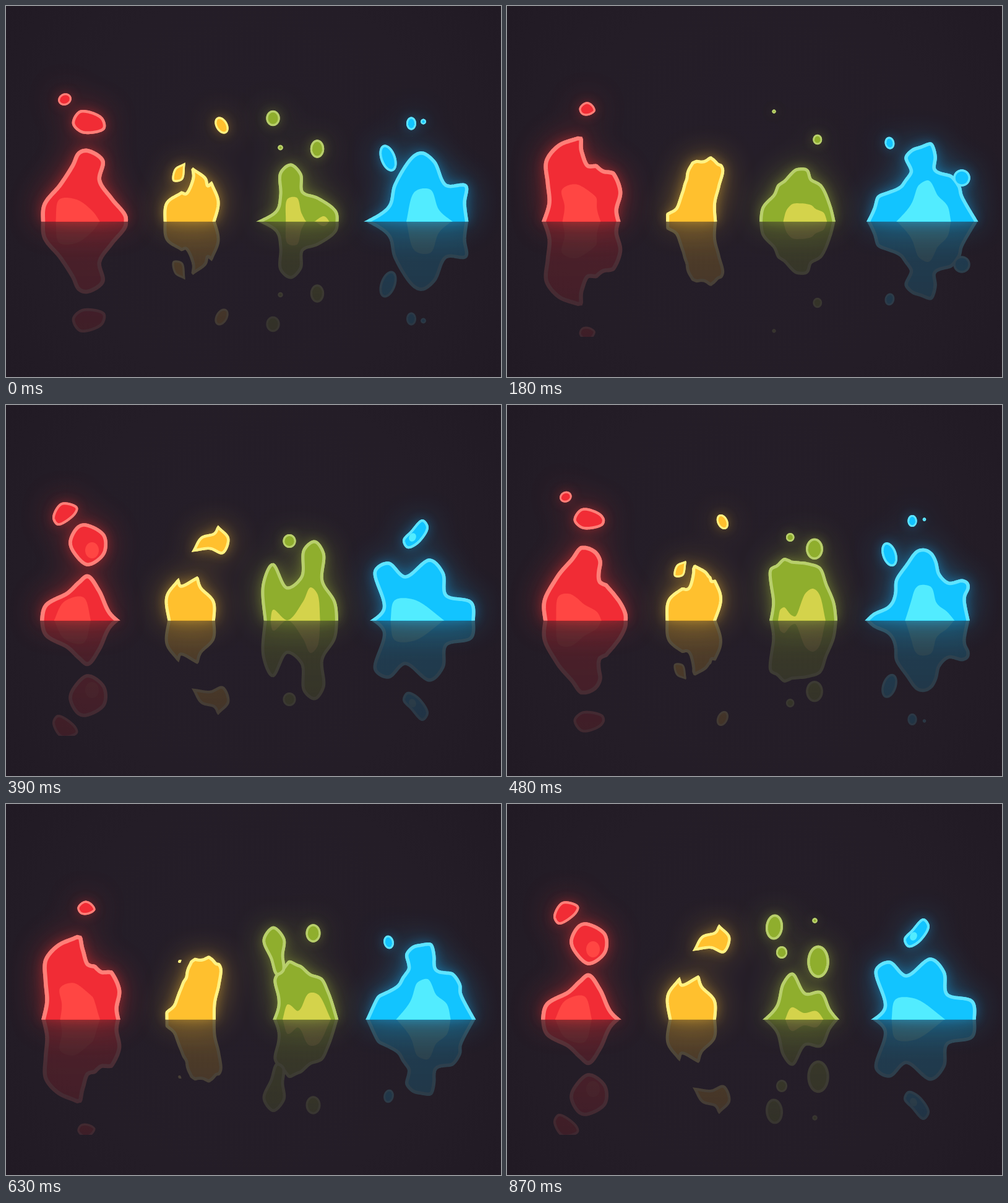
These frames come from a looping animation (800 by 600 pixels, 0.9 s). An HTML page with a canvas:

```html
<!DOCTYPE html>
<html lang="en">
<head>
<meta charset="utf-8">
<title>Elemental blobs</title>
<style>
html, body { margin: 0; width: 100%; height: 100%; overflow: hidden; background: #231c26; }
canvas { display: block; width: 800px; height: 600px; }
</style>
</head>
<body>
<canvas id="stage" width="800" height="600"></canvas>
<script>
const W = 800, H = 600, FLOOR = 348, STEP = 30, FRAMES = 30, CYCLE = 15, N = 170;

const element = (fill, edge, glint, glow, line, period) =>
  ({ fill, edge, glint, glow, line, period, bodies: [], shines: [] });
const red = element('#f12c35', '#ff7f78', '#ff4643', '255,50,50', 6.5, CYCLE);
const yellow = element('#ffc02e', '#fff283', '', '255,196,50', 5, CYCLE);
const green = element('#8fae2d', '#b8cf6c', '#d4d34b', '165,190,55', 5, FRAMES);
const blue = element('#12c4ff', '#5fe4ff', '#52ecff', '20,180,255', 5.5, CYCLE);

const mix = (a, b, t) => [a[0] + (b[0] - a[0]) * t, a[1] + (b[1] - a[1]) * t];
const gap = (a, b) => Math.hypot(b[0] - a[0], b[1] - a[1]);

function ellipse([cx, cy, rx, ry = rx, tilt = 0]) {
  const r = tilt * Math.PI / 180, c = Math.cos(r), s = Math.sin(r);
  return Array.from({ length: N }, (_, i) => {
    const a = Math.PI + i / N * 2 * Math.PI, x = rx * Math.cos(a), y = ry * Math.sin(a);
    return [cx + x * c - y * s, cy + x * s + y * c];
  });
}

// Centripetal spline through the points, resampled evenly. A negative x marks a corner.
function curve(nums, open) {
  const pts = [];
  for (let i = 0; i < nums.length; i += 2) {
    const p = [Math.abs(nums[i]), nums[i + 1]];
    pts.push(p);
    if (nums[i] < 0) pts.push(p);
  }
  const n = pts.length, fine = [];
  const at = i => open ? pts[Math.max(0, Math.min(n - 1, i))] : pts[(i + n) % n];
  for (let i = 0; i < (open ? n - 1 : n); i++) {
    const [a, b, c, d] = [at(i - 1), at(i), at(i + 1), at(i + 2)];
    const u = Math.sqrt(gap(a, b)), v = Math.sqrt(gap(b, c)), w = Math.sqrt(gap(c, d));
    if (!v) continue;
    const coef = [0, 1].map(j => {
      const e = c[j] - b[j];
      const m = u ? e + v * ((b[j] - a[j]) / u - (c[j] - a[j]) / (u + v)) : e;
      const q = w ? e + v * ((d[j] - c[j]) / w - (d[j] - b[j]) / (v + w)) : e;
      return [b[j], m, 3 * e - 2 * m - q, m + q - 2 * e];
    });
    for (let k = 0; k < 20; k++) {
      const t = k / 20;
      fine.push(coef.map(([p, q, r, s]) => p + t * (q + t * (r + t * s))));
    }
  }
  fine.push(at(open ? n - 1 : 0));
  const len = [0];
  for (let i = 1; i < fine.length; i++) len.push(len[i - 1] + gap(fine[i - 1], fine[i]));
  const total = len[len.length - 1], out = [];
  for (let i = 0, k = 1; i < N; i++) {
    const want = total * i / (open ? N - 1 : N);
    while (k < len.length - 1 && len[k] < want) k++;
    out.push(mix(fine[k - 1], fine[k], (want - len[k - 1]) / (len[k] - len[k - 1] || 1)));
  }
  return out;
}

// Another key's pose, stretched upward from the floor.
const as = (of, k = 1) => ({ of, k });

function shrunk(pts) {
  const sum = pts.reduce((s, p) => [s[0] + p[0], s[1] + p[1]], [0, 0]);
  const c = [sum[0] / N, sum[1] / N - 4];
  return pts.map(p => mix(c, p, .02));
}

// Up to five numbers: an ellipse (cx, cy, rx, ry, tilt). More: curve points. Null: shrink away.
function track(poses, open) {
  const times = Object.keys(poses).map(Number).sort((a, b) => a - b);
  const solve = t => {
    const p = poses[t];
    if (!p) return shrunk(solve(times[times.indexOf(t) - 1]));
    if (p.of !== undefined) return solve(p.of).map(([x, y]) => [x, FLOOR + (y - FLOOR) * p.k]);
    return p.length < 6 ? ellipse(p) : curve(p, open);
  };
  return times.map(at => ({ at, pts: solve(at) }));
}

const looped = (e, poses) => track({ ...poses, [e.period]: as(0) }, true);
const base = (e, poses) => e.bodies.push(looped(e, poses));
const shine = (e, poses) => e.shines.push(looped(e, poses));
const drop = (e, poses) => e.bodies.push(track(poses, false));
const spot = (e, poses) => e.shines.push(track(poses, false));

base(red, {
  0: [60,356, 62,322, 88,289, 108,258, 118,238, 131,234, 156,250, 151,282, 171,312, 193,340, 193,356],
  3: [69,356, 54,302, 66,259, 106,233, -118,221, 141,238, 137,275, 148,294, -162,280, 185,308, 188,356],
  8: [48,358, 77,319, 73,285, 61,246, 80,214, -118,209, 107,233, 124,256, -147,242, 178,264, 184,298, 169,330, 179,358],
  9: [53,358, 92,312, 97,267, 72,222, 82,196, -121,198, 108,217, 123,240, -148,228, 175,249, 178,282, 161,322, 180,358],
  11: as(9, 1.06),
  12: as(13, 1.05),
  13: [57,358, 64,325, 100,304, 118,287, 132,277, 150,300, 167,336, 188,356]
});
drop(red, {
  12: as(13, .95),
  13: [104,222, 115,199, 127,194, 158,211, 158,240, 132,258, 111,240],
  15: [109,190, 120,171, 154,181, 158,198, 124,204],
  18: [111,178, 126,165, 151,178, 121,188],
  23: [129,160, 6.5,9, 25],
  24: null
});
drop(red, {
  12: as(13, .97),
  13: [77,182, 90,160, 114,166, 110,177, 84,193],
  15: [95,151, 9.5,8, -25],
  18: [94.5,144, 6.5,5.5, -30],
  20: null
});
shine(red, {
  0: [80,352, 86,313, 114,313, 140,332, 154,352],
  3: [77,352, 80,300, 100,296, 118,325, 149,331, 155,352],
  8: [97,352, 104,322, 95,295, 120,283, 159,297, 143,329, 151,352],
  9: [94,352, 116,313, 113,277, 138,273, 148,297, 140,326, 149,352],
  13: [76,352, 94,318, 125,311, 138,352]
});
spot(red, { 12: as(13, .95), 13: [139,235, 11,13], 15: null });

base(yellow, {
  0: [257,356, 260,319, -284,302, 291,304, 303,278, -302,264, 322,279, 326,291, -332,287, 343,317, 334,356],
  3: [262,356, 265,308, 283,288, 296,286, -299,252, 326,262, 331,270, -336,268, 352,303, 331,356],
  8: [258,358, -258,336, 282,334, 291,304, 288,264, -301,249, 324,250, -334,236, 355,257, 336,287, 328,315, 342,358],
  9: [259,358, -261,318, 288,317, 301,285, 296,254, 320,241, -337,225, 360,250, 337,273, 327,300, 343,358],
  11: as(9, 1.08),
  12: as(13, .94),
  13: [265,356, 260,310, -278,284, 282,293, -309,280, 314,295, 335,318, 335,356]
});
drop(yellow, {
  12: as(13, .94),
  13: [-304,235, 316,215, 337,208, -343,198, 359,216, 350,239, 330,232],
  15: [348.5,193, 8,13, -30],
  18: [348,181, 5.5,8, -10],
  20: null
});
drop(yellow, {
  14: as(15, .92),
  15: [271,282, 274,264, -288,256, 284,280],
  18: [273,264, 277,252, -289,250, 283,265],
  21: null
});

base(green, {
  0: [400,354, 438,331, 444,305, 444,270, 460,257, 476,272, 479,301, 504,311, 533,333, 535,356],
  3: [408,358, 416,327, 447,313, 441,260, 460,243, 476,260, 471,298, 498,296, 526,322, 533,358],
  9: [411,358, 414,306, 430,285, 456,306, 478,282, 499,252, 516,275, 518,326, 528,358],
  13: [420,358, 416,290, 431,258, 454,296, 478,278, 482,234, 499,221, 513,240, 511,285, 531,319, 535,358],
  18: [428,358, 441,320, 419,260, 433,224, 448,260, 468,279, 502,272, 520,296, 531,358],
  24: [433,358, 444,320, 448,295, 475,294, 502,262, 518,280, 521,312, 544,358],
  29: [407,358, 436,328, 447,290, 461,275, 482,307, 507,305, 522,334, 542,358]
});
drop(green, {
  21: as(24, .96),
  24: [417,214, 432,194, 449,213, 447,240, 448,266, 438,272, 429,246],
  29: [432,199, 12,18.5, 5],
  30: [431.5,181.5, 9.5,11],
  33: [431.5,173.5, 7.5],
  37: null
});
drop(green, { 28: as(29, .96), 29: [444,240, 7.5,8.5], 30: [443.5,229, 3], 31: null });
drop(green, {
  27: as(29, .94),
  29: [503,255, 15.5,24],
  30: [503,231, 9.5,13],
  33: [502,221, 8.5,9.5],
  39: [501.5,211, 3.5,4],
  41: null
});
drop(green, {
  7: as(9, .95),
  9: [445,245, 459,223, 474,233, 462,254, 448,259],
  13: [458,220, 9,9.5],
  18: [457.5,210, 3],
  19: null
});
drop(green, { 16: as(18, .9), 18: [497,220, 12,17], 24: [496,198, 8.5,9], 29: [497.5,188.5, 3], 30: null });
shine(green, {
  0: [452,352, 455,312, 470,310, 478,336, 490,352, 514,340, 525,352],
  3: [448,352, 457,314, 474,318, 491,343, 514,335, 523,352],
  9: [443,352, 452,332, 480,322, 500,307, 514,352],
  13: [427,352, 432,331, 455,348, 480,318, 492,295, 503,305, 508,352],
  18: [444,352, 453,320, 468,341, 480,303, 500,300, 521,352],
  24: [448,352, 460,325, 480,329, 500,310, 533,352],
  29: [448,352, 460,329, 480,338, 500,335, 514,352]
});

base(blue, {
  0: [570,357, 619,325, 629,289, 659,243, 673,238, 692,252, 711,290, 743,291, 741,319, 746,358],
  3: [583,358, 593,328, 622,321, 635,295, 631,272, 653,249, 673,224, 695,239, 692,278, 716,285, 741,273, 746,293, 735,305, 749,358],
  8: [577,358, 595,328, 590,298, 645,295, 662,274, 634,251, 658,229, 679,205, 693,226, 677,252, 722,294, 773,357],
  9: [590,358, 605,330, 591,291, 612,281, 648,298, 667,271, 636,238, 658,217, 676,199, 688,219, 671,253, 718,287, 764,358],
  10: as(9, 1.03),
  11: as(13, .97),
  13: [582,357, 611,330, 597,268, 618,256, 645,278, 685,251, 706,272, 711,308, 752,320, 755,358]
});
drop(blue, {
  11: as(13, .97),
  13: [643,219, 655,205, 673,187, 681,198, 665,223, 649,230],
  15: [655,190, 6.5,9],
  18: [655,182.5, 5.5,6.5],
  21: null
});
drop(blue, { 15: [674.5,187, 3.2], 17: null });
drop(blue, { 14: as(15, .92), 15: [617.5,246, 10.5,20.5, -20], 18: [619,233, 8.5,14, -15], 23: [618,214, 5], 24: null });
drop(blue, { 6: [735,278, 12], 8: [732.5,272, 9], 9: [732,264, 6.5,7.5], 12: null });
shine(blue, {
  0: [646,352, 661,300, 686,297, 700,330, 726,352],
  3: [634,352, 655,312, 662,283, 683,288, 690,318, 716,325, 726,352],
  8: [621,352, 650,328, 680,278, 706,310, 713,352],
  9: [606,352, 618,328, 650,322, 682,288, 698,313, 724,352],
  13: [621,352, 628,316, 660,315, 713,352]
});
spot(blue, { 7: as(8), 8: [664,253, 4.5,7], 9: [659,240, 9], 13: [657,214, 5.5,7, 25], 15: null });

function pose(keys, time, period) {
  for (const t of [time, time + period]) {
    const i = keys.findIndex(k => k.at >= t);
    if (i < 0 || (i === 0 && keys[0].at > t)) continue;
    if (keys[i].at === t) return keys[i].pts;
    const a = keys[i - 1], b = keys[i], f = (t - a.at) / (b.at - a.at);
    return a.pts.map((p, j) => mix(p, b.pts[j], f));
  }
  return null;
}

function size(pts) {
  let area = 0;
  pts.forEach((p, i) => { const q = pts[(i + 1) % N]; area += p[0] * q[1] - q[0] * p[1]; });
  return Math.sqrt(Math.abs(area) / 2);
}

const layer = () => Object.assign(document.createElement('canvas'), { width: W, height: H }).getContext('2d');
const stage = document.getElementById('stage').getContext('2d');
const blob = layer(), mirror = layer();

const backdrop = stage.createRadialGradient(400, 300, 60, 400, 300, 500);
backdrop.addColorStop(0, '#251e29');
backdrop.addColorStop(.6, '#241d27');
backdrop.addColorStop(1, '#211a24');

const fade = mirror.createLinearGradient(0, FLOOR, 0, 535);
fade.addColorStop(0, 'rgba(0,0,0,.26)');
fade.addColorStop(.35, 'rgba(0,0,0,.18)');
fade.addColorStop(1, 'rgba(0,0,0,.13)');

function trace(pts) {
  blob.beginPath();
  pts.forEach(p => blob.lineTo(p[0], p[1]));
  blob.closePath();
  blob.fill();
}

function drawElement(e, time) {
  blob.clearRect(0, 0, W, H);
  blob.save();
  blob.beginPath();
  blob.rect(0, 0, W, FLOOR + .5);
  blob.clip();
  blob.miterLimit = 4;
  blob.strokeStyle = e.edge;
  blob.fillStyle = e.fill;
  for (const body of e.bodies) {
    const pts = pose(body, time, e.period), s = pts && size(pts);
    if (!pts || s < 2) continue;
    trace(pts);
    blob.lineWidth = Math.min(e.line, 2 + s * .07);
    blob.stroke();
  }
  blob.fillStyle = e.glint;
  for (const keys of e.shines) {
    const pts = pose(keys, time, e.period);
    if (pts) trace(pts);
  }
  blob.restore();
}

function glow(e, alpha, blur) {
  stage.shadowColor = `rgba(${e.glow},${alpha})`;
  stage.shadowBlur = blur;
  stage.drawImage(blob.canvas, 0, 0);
}

// The flames run twice per loop, the second pass a little slower.
function flameTime(f) {
  if (f <= 18) return f % CYCLE;
  return f < 24 ? 3 + (f - 18) * 5 / 6 : f - 16;
}

function draw(now) {
  const f = Math.floor(now / STEP) % FRAMES;
  stage.fillStyle = backdrop;
  stage.fillRect(0, 0, W, H);

  mirror.clearRect(0, 0, W, H);
  for (const e of [red, yellow, green, blue]) {
    drawElement(e, e.period === FRAMES ? f : flameTime(f));
    stage.save();
    glow(e, .42, 52);
    glow(e, .36, 18);
    stage.restore();
    mirror.save();
    mirror.transform(1, 0, 0, -1, 0, 2 * FLOOR);
    mirror.drawImage(blob.canvas, 0, 0);
    mirror.restore();
  }
  mirror.globalCompositeOperation = 'destination-in';
  mirror.fillStyle = fade;
  mirror.fillRect(0, FLOOR, W, 535 - FLOOR);
  mirror.globalCompositeOperation = 'source-over';
  stage.drawImage(mirror.canvas, 0, 0);
}

function tick() {
  draw(performance.now());
  requestAnimationFrame(tick);
}
tick();
</script>
</body>
</html>
```
